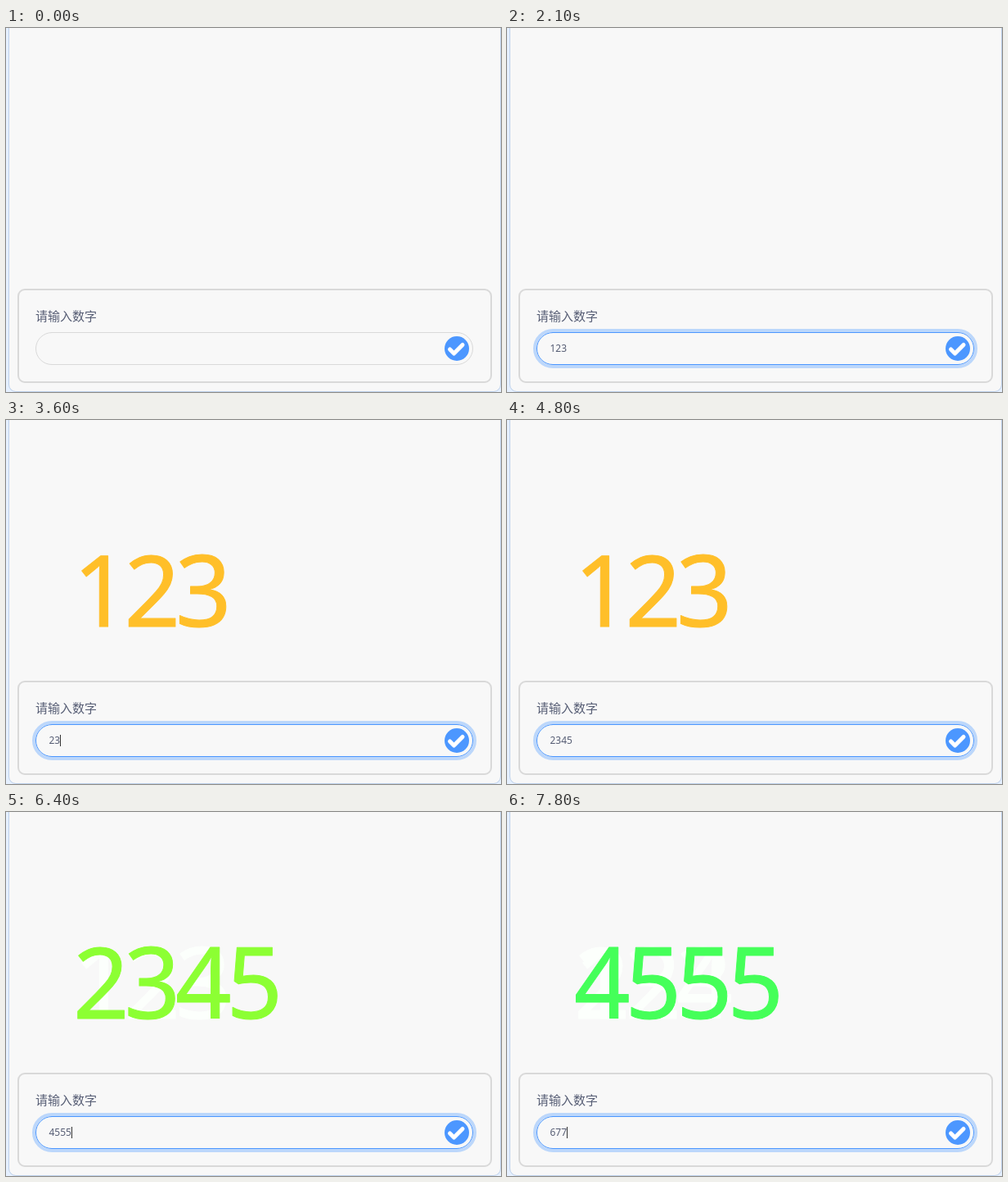
These frames come from a looping animation (605x444 px, 8 s). An HTML page with a canvas:

```html
<!DOCTYPE html>
<html lang="zh">
<head>
<meta charset="utf-8">
<style>
  html, body { margin: 0; width: 100%; height: 100%; overflow: hidden; }
  canvas { display: block; }
</style>
</head>
<body>
<canvas id="stage" width="605" height="444"></canvas>
<script>
const ctx = document.getElementById('stage').getContext('2d');
const LOOP = 8000, STEP = 100, BLINK = 500;
const PAPER = '#f8f8f8', GREY = '#d9d9d9', INK = '#575e75', BLUE = '#4c97ff', GHOST = '#fcfffc';

// One entry per question: focus time, key presses, submit time.
const rounds = [
  { open: 400, text: '123', keys: [1200, 1400, 1600], sent: 2300, color: '#ffbf29' },
  { open: 2500, text: '2345', keys: [3300, 3600, 4000, 4300], sent: 5300, color: '#8cff33' },
  { open: 5500, text: '4555', keys: [5900, 6100, 6300, 6400], sent: 6900, color: '#45ff59' },
  { open: 7100, text: '677', keys: [7500, 7600, 7800], sent: Infinity }
];

// Rounded box given by its outer edges, with the border drawn inside.
function box(x, y, w, h, radius, line, stroke, fill) {
  ctx.beginPath();
  ctx.roundRect(x + line / 2, y + line / 2, w - line, h - line, radius - line / 2);
  if (fill) { ctx.fillStyle = fill; ctx.fill(); }
  ctx.lineWidth = line;
  ctx.strokeStyle = stroke;
  ctx.stroke();
}

function label(text, x, y, font, color) {
  ctx.font = font;
  ctx.fillStyle = color;
  ctx.fillText(text, x, y);
}

function ring(spread, color) {
  box(36 - spread, 371 - spread, 535 + 2 * spread, 40 + 2 * spread, 20 + spread, spread, color);
}

function mixGreyBlue(p) {
  const mix = (a, b) => Math.round(a + (b - a) * p);
  return `rgb(${mix(217, 76)},${mix(217, 151)},${mix(217, 255)})`;
}

function drawNumber({ text, color }, ghost) {
  ctx.lineWidth = 1;
  ctx.strokeStyle = ghost ? GHOST : color;
  [...text].forEach((digit, i) => {
    const x = 82 + 62.5 * i;
    label(digit, x, 252, '500 120px "Noto Sans", sans-serif', ctx.strokeStyle);
    ctx.strokeText(digit, x, 252);
  });
}

function drawButton(disc, check) {
  ctx.fillStyle = disc;
  ctx.beginPath();
  ctx.arc(551, 391, 15, 0, 2 * Math.PI);
  ctx.fill();
  ctx.beginPath();
  ctx.moveTo(542.5, 392);
  ctx.lineTo(547.5, 397);
  ctx.lineTo(558, 386.5);
  ctx.lineWidth = 5;
  ctx.lineCap = ctx.lineJoin = 'round';
  ctx.strokeStyle = check;
  ctx.stroke();
}

const drawPrompt = color => label('请输入数字', 36, 357, '500 15px "Noto Sans CJK SC", "Noto Sans CJK", sans-serif', color);
const drawInput = (text, color) => label(text, 52.5, 395, '12px "Noto Sans", sans-serif', color);

function drawHiddenPanel(text) {
  box(14, 318, 580, 115, 9, 2, GHOST);
  drawPrompt(GHOST);
  box(34, 369, 539, 44, 22, 3.5, GHOST);
  drawInput(text, GHOST);
  drawButton(GHOST, PAPER);
}

function drawPanel(t, round, previous) {
  const focused = t >= round.open;
  const k = focused ? Math.min(1, (t - round.open + 50) / 300) : 0;
  const p = 1 - (1 - k) ** 2;

  box(14, 318, 580, 115, 9, 2, GREY, PAPER);
  drawPrompt(INK);
  if (previous && p < 1) {
    ring(4, '#fff');
    drawInput(previous.text, '#fff');
  }
  if (focused) ring(4 * p, `rgba(76,151,255,${0.35 * p})`);
  box(36, 371, 535, 40, 20, 1, mixGreyBlue(p));

  const pressed = round.keys.filter(key => key <= t);
  drawInput(round.text.slice(0, pressed.length), INK);
  const lastEvent = pressed.at(-1) ?? round.open;
  if (focused && Math.floor((t - lastEvent) / BLINK) % 2 === 0) {
    ctx.fillStyle = '#333';
    ctx.fillRect(Math.floor(53 + 6.8 * pressed.length), 384, 1, 14);
  }
  drawButton(BLUE, '#fff');
}

function draw(t) {
  ctx.fillStyle = '#e5f0ff';
  ctx.fillRect(0, 0, 605, 444);
  box(3, -20, 602, 464, 9, 1, '#bdd0ea', PAPER);

  const printed = rounds.filter(r => t >= r.sent + STEP);
  printed.forEach((r, i) => drawNumber(r, i < printed.length - 1));

  const index = Math.max(0, rounds.findLastIndex(r => t >= r.open));
  const round = rounds[index];
  if (t >= round.sent) drawHiddenPanel(round.text);
  else drawPanel(t, round, rounds[index - 1]);
}

function frame() {
  const t = performance.now() % LOOP;
  draw(Math.floor(t / STEP) * STEP);
  requestAnimationFrame(frame);
}
frame();
</script>
</body>
</html>
```
